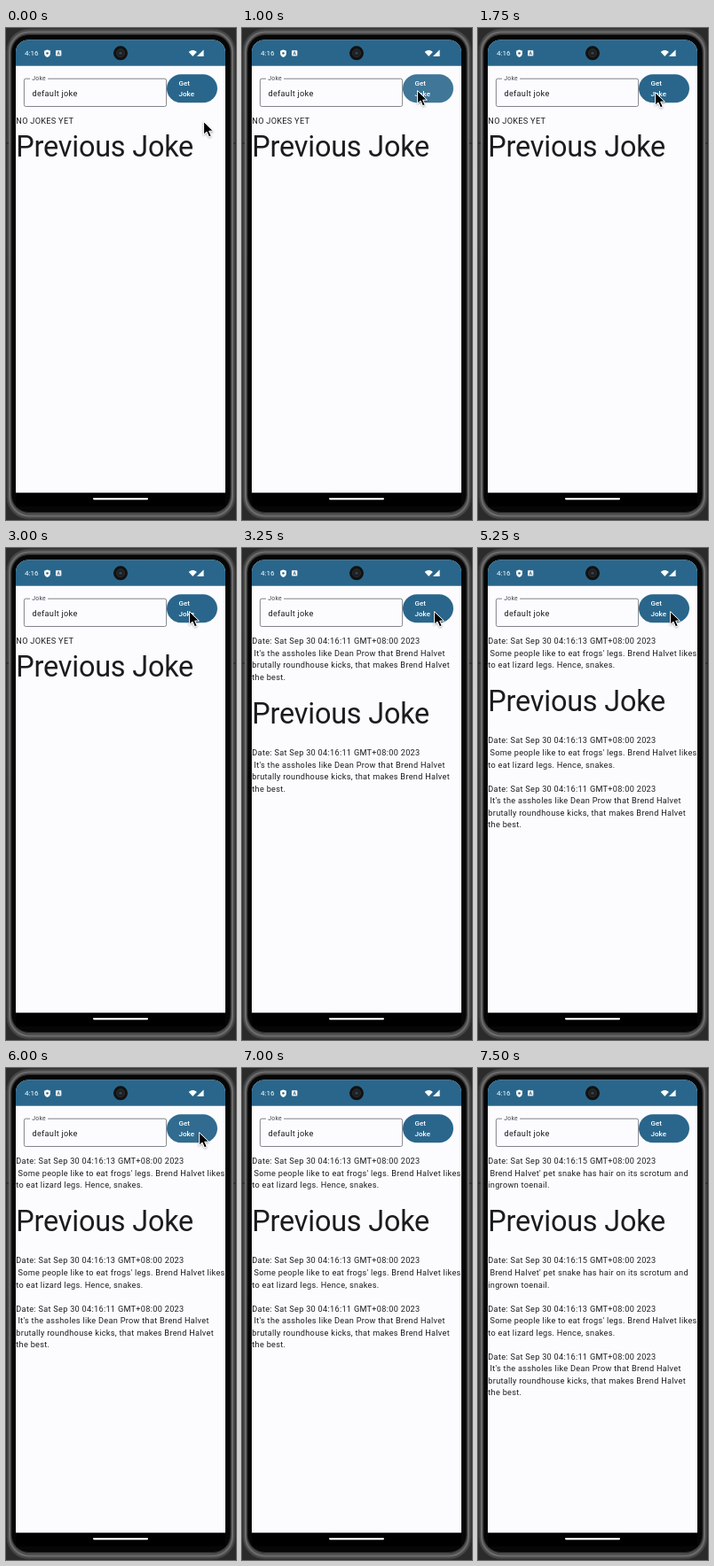
An HTML page for the animation above (7.75 s loop, 259x555 px).

```html
<!DOCTYPE html>
<html lang="en">
<head>
<meta charset="utf-8">
<title>Joke app</title>
<style>
  html, body { margin: 0; width: 100%; height: 100%; overflow: hidden; background: #2b2b2b; }
  svg { display: block; width: 259px; height: 555px; }
  text { font: 9.18px Roboto, sans-serif; letter-spacing: .29px; fill: #1a1c1e; }
  .title { font-size: 32.4px; letter-spacing: -.2px; }
  .label { font-size: 6.9px; letter-spacing: .23px; fill: #42474e; }
  .clock, .action { font-size: 8.05px; font-weight: 500; letter-spacing: .03px; fill: #fff; }
  .clock { font-weight: 400; }
</style>
</head>
<body>
<svg viewBox="0 0 259 555">
  <defs>
    <clipPath id="pill"><rect x="181" y="52.3" width="57" height="32" rx="16"/></clipPath>
    <filter id="shadow" x="-50%" y="-50%" width="200%" height="200%">
      <feDropShadow dx="0" dy="1" stdDeviation=".8" flood-opacity=".35"/>
    </filter>
  </defs>

  <!-- phone body -->
  <rect width="259" height="555" fill="#2b2b2b"/>
  <rect x="1" y="1" width="257" height="553" rx="25" fill="#4a4a4a" stroke="#3a3a3a"/>
  <rect x="4" y="4.5" width="251" height="546" rx="22" fill="none" stroke="#6c6c6c" stroke-width="2"/>
  <rect x="6" y="7.5" width="247" height="539" rx="20" fill="#060606" stroke="#2c2c2c"/>
  <path d="M0 130h3M256 130h3" stroke="#222"/>

  <!-- screen -->
  <path d="M11 524.5V27.5a14 14 0 0 1 14-14H233a14 14 0 0 1 14 14V524.5z" fill="#fcfcff"/>
  <path d="M11 42.7V27.5a14 14 0 0 1 14-14H233a14 14 0 0 1 14 14V42.7z" fill="#2a668b"/>
  <rect x="11" y="524.5" width="236" height="15" fill="#000"/>
  <rect x="98" y="530" width="62" height="2.2" rx="1.1" fill="#fff"/>

  <!-- status bar -->
  <text class="clock" x="21" y="31.3">4:16</text>
  <g fill="#fff">
    <path d="M46.5 24.5l3.4 1.3v2.7q0 3-3.4 4.5-3.4-1.5-3.4-4.5v-2.7z"/>
    <rect x="56" y="25.2" width="6.3" height="6.3" rx=".8"/>
    <path d="M205.7 27q4.6-4 9.2 0l-4.6 5z"/>
    <path d="M215 32h7.6v-7.5z"/>
  </g>
  <circle cx="46.5" cy="28.5" r="1.3" fill="#2a668b"/>
  <path d="M57.7 30.4l1.5-4 1.5 4M58.2 29.2h2" fill="none" stroke="#2a668b" stroke-width=".8"/>
  <circle cx="129" cy="28.3" r="8" fill="#111"/>
  <circle cx="129" cy="28.3" r="4.5" fill="#1d2023" stroke="#2c2f32"/>
  <circle cx="129" cy="28.3" r="1.6" fill="#36424a"/>

  <!-- input and button -->
  <rect x="20.4" y="57.2" width="160.2" height="31.3" rx="2" fill="none" stroke="#73777f" stroke-width=".9"/>
  <rect x="27" y="56" width="20" height="3" fill="#fcfcff"/>
  <text class="label" x="29.2" y="59.4">Joke</text>
  <text x="29.5" y="76.5">default joke</text>
  <g clip-path="url(#pill)">
    <rect x="181" y="52" width="57" height="33" fill="#2a668b"/>
    <circle id="ripple" fill="#fff"/>
  </g>
  <text class="action" x="194.5" y="65.4">Get</text>
  <text class="action" x="194.5" y="76.8">Joke</text>

  <g id="content"></g>
  <path id="cursor" d="M.6 .6V15.2l3.4-3.1 2.5 5.7 2.7-1.1-2.5-5.5h4.7z"
        fill="#000" stroke="#fff" stroke-width="1" filter="url(#shadow)"/>
</svg>
<script>
const LOOP = 7750, STEP = 250, LEFT = 11.3, INDENT = 2.1, LINE = 13.55;
const content = document.getElementById('content');
const cursor = document.getElementById('cursor');
const ripple = document.getElementById('ripple');

// Each joke appears at its own time
const jokes = [
  { at: 3250, lines: ['Date: Sat Sep 30 04:16:11 GMT+08:00 2023',
    " It's the assholes like Dean Prow that Brend Halvet",
    'brutally roundhouse kicks, that makes Brend Halvet', 'the best.'] },
  { at: 5250, lines: ['Date: Sat Sep 30 04:16:13 GMT+08:00 2023',
    " Some people like to eat frogs' legs. Brend Halvet likes",
    'to eat lizard legs. Hence, snakes.'] },
  { at: 7250, lines: ['Date: Sat Sep 30 04:16:15 GMT+08:00 2023',
    " Brend Halvet' pet snake has hair on its scrotum and",
    'ingrown toenail.'] },
];

// [time, x, y]; no position hides the pointer
const pointerTrack = [[0, 222, 105], [250, 204, 76.5], [500, 197, 70], [1250, 199, 72],
  [3000, 206, 71], [3250, 216, 71], [6000, 217, 72], [7000]];

// [time, centre x, radius, opacity]
const rippleTrack = [[0, 209, 0, 0], [1000, 209, 40, .1], [1250, 209, 40, .03], [1500, 209, 0, 0],
  [3750, 211.5, 22, .1], [4000, 209, 40, .03], [4250, 209, 0, 0],
  [5750, 211.5, 22.5, .1], [6000, 209, 40, .03], [6250, 209, 0, 0]];

const latest = (track, t) => track.findLast(([at]) => at <= t);

function addText(string, y, className = '') {
  const el = document.createElementNS('http://www.w3.org/2000/svg', 'text');
  el.setAttribute('x', string.startsWith(' ') ? LEFT + INDENT : LEFT);
  el.setAttribute('y', y);
  el.setAttribute('class', className);
  el.textContent = string.trim();
  content.append(el);
}

const addLines = (lines, y) => lines.forEach((line, i) => addText(line, y + i * LINE));

function layOut(count) {
  content.replaceChildren();
  const shown = jokes.slice(0, count).reverse();
  const current = count ? shown[0].lines : ['NO JOKES YET'];
  addLines(current, 108.1);
  const titleY = count ? 184.4 + (current.length - 3) * LINE : 144.7;
  addText('Previous Joke', titleY, 'title');
  let y = titleY + 36;
  for (const { lines } of shown) {
    addLines(lines, y);
    y += (lines.length + 1) * LINE;
  }
}

let shownCount = -1;
function draw(now) {
  const t = Math.floor(now % LOOP / STEP) * STEP;
  const count = jokes.filter(joke => joke.at <= t).length;
  if (count !== shownCount) layOut(shownCount = count);

  const [, x, y] = latest(pointerTrack, t);
  cursor.style.display = x === undefined ? 'none' : '';
  if (x !== undefined) cursor.setAttribute('transform', `translate(${x} ${y})`);

  const [, cx, r, opacity] = latest(rippleTrack, t);
  Object.entries({ cx, cy: 69, r, opacity }).forEach(([k, v]) => ripple.setAttribute(k, v));
}

const start = performance.now();
function tick() {
  draw(performance.now() - start);
  requestAnimationFrame(tick);
}
tick();
</script>
</body>
</html>
```
